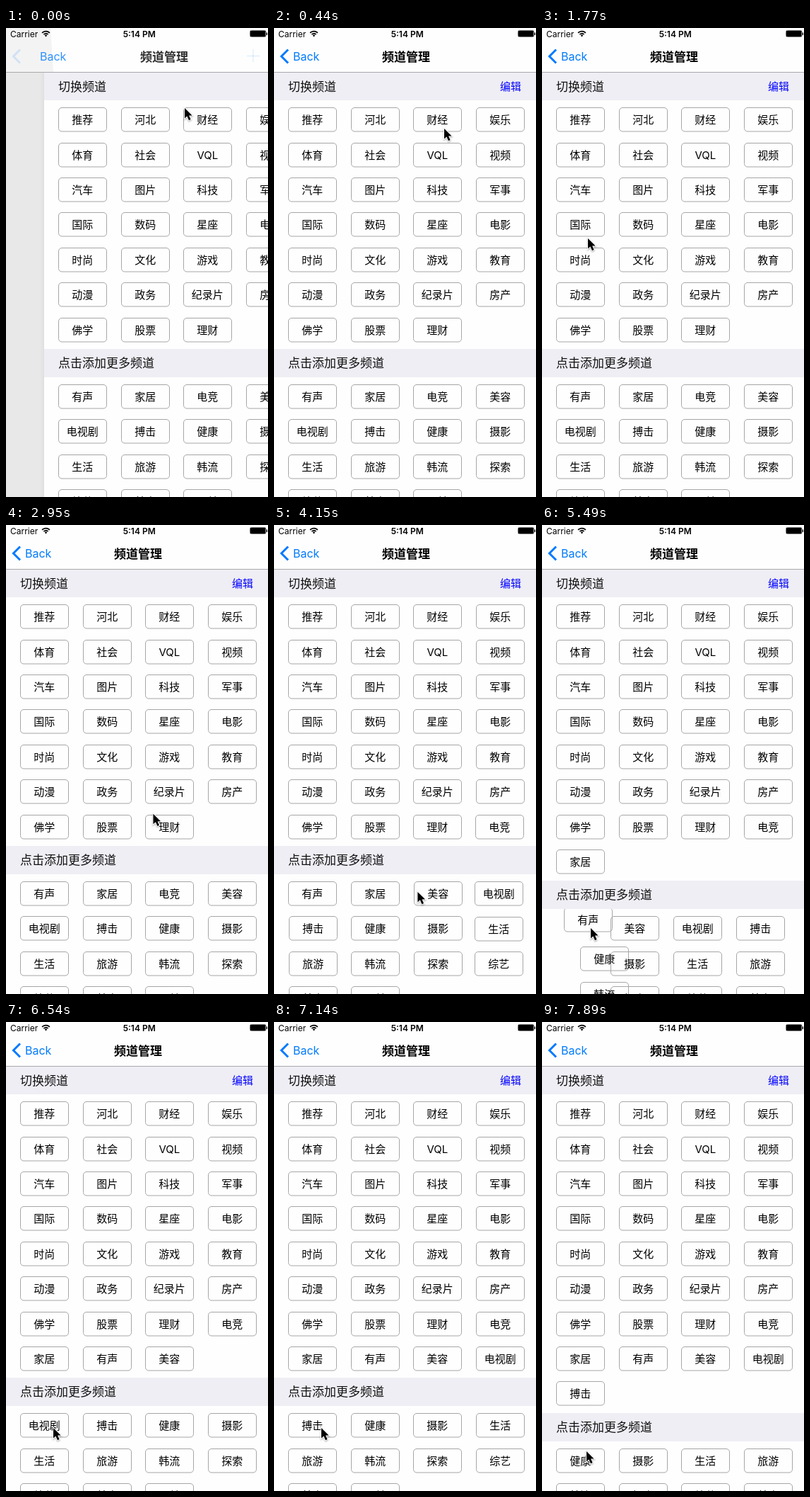
Write an HTML page with a canvas that moves like this. It is 371 by 662 pixels and loops after 8 s.

```html
<!DOCTYPE html>
<html lang="zh-CN">
<head>
<meta charset="utf-8">
<title>频道管理</title>
<style>
html, body { margin: 0; width: 100%; height: 100%; overflow: hidden; background: #fefefe; }
canvas { display: block; width: 371px; height: 662px; }
</style>
</head>
<body>
<canvas id="stage"></canvas>
<script>
const W = 371, H = 662, LOOP = 8000;
const canvas = document.getElementById('stage');
const ctx = canvas.getContext('2d');
const dpr = window.devicePixelRatio || 1;
canvas.width = W * dpr;
canvas.height = H * dpr;

const CJK = '"Noto Sans CJK SC", "Noto Sans CJK", "Noto Sans CJK JP", sans-serif';
const LATIN = 'Inter, sans-serif';
const BLUE = '#007aff';

const mine = ('推荐 河北 财经 娱乐 体育 社会 VQL 视频 汽车 图片 科技 军事 国际 数码 星座 电影 ' +
  '时尚 文化 游戏 教育 动漫 政务 纪录片 房产 佛学 股票 理财').split(' ');
const more = '有声 家居 电竞 美容 电视剧 搏击 健康 摄影 生活 旅游 韩流 探索 综艺 美食 公益'.split(' ');

const COL = 88.7, ROW = 49.4, MOVE = 300;
const taps = [[3862, '电竞'], [4640, '家居'], [5416, '有声'], [6130, '美容'], [6740, '电视剧'], [7370, '搏击']];

// Pointer stops: arrival time, x, y. It rests, then glides for at most GLIDE ms.
const GLIDE = 600;
const stops = [
  [0, 253, 113], [430, 241, 142], [725, 172, 243], [1180, 136, 275], [1465, 112, 249],
  [1760, 65, 297], [2300, 105, 314], [2940, 223, 421], [3690, 221, 517],
  [4580, 127, 522], [5340, 69, 569], [6400, 67, 573], [7850, 63, 606]
];

// The screen refreshes at a coarse, steady rate.
const TICK = 148.6;
const snap = t => Math.max(0, Math.floor((t + 20) / TICK) * TICK - 15);

const lerp = (a, b, f) => a + (b - a) * f;
const ease = f => f <= 0 ? 0 : f >= 1 ? 1 : f * f * (3 - 2 * f);

function pointerAt(t) {
  const next = stops.findIndex(s => s[0] > t);
  if (next < 0) return stops[stops.length - 1].slice(1);
  const [t0, x0, y0] = stops[next - 1], [t1, x1, y1] = stops[next];
  const from = Math.max(t0, t1 - GLIDE);
  const f = ease((t - from) / (t1 - from));
  return [lerp(x0, x1, f), lerp(y0, y1, f)];
}

function layout(count) {
  const moved = taps.slice(0, count).map(p => p[1]);
  const top = mine.concat(moved);
  const header = 106.95 + ROW * Math.ceil(top.length / 4);
  const cells = {};
  const place = (list, y) => list.forEach((name, i) => {
    cells[name] = [20 + COL * (i % 4), y + ROW * Math.floor(i / 4)];
  });
  place(top, 112.2);
  place(more.filter(name => !moved.includes(name)), header + 50);
  return { cells, header };
}
const layouts = Array.from({ length: taps.length + 1 }, (_, n) => layout(n));

function text(str, x, cy, size, color, align = 'left', family = CJK, weight = 400) {
  ctx.font = `${weight} ${size}px ${family}`;
  ctx.textAlign = align;
  ctx.fillStyle = color;
  ctx.fillText(str, x, cy + size * 0.37);
}

function rect(x, y, w, h, color) {
  ctx.fillStyle = color;
  ctx.fillRect(x, y, w, h);
}

function trace(points) {
  ctx.beginPath();
  points.forEach(([x, y]) => ctx.lineTo(x, y));
}

function line(points, color, width) {
  trace(points);
  ctx.strokeStyle = color;
  ctx.lineWidth = width;
  ctx.stroke();
}

function cell(name, x, y) {
  x = Math.round(x);
  y = Math.round(y);
  ctx.beginPath();
  ctx.roundRect(x + 0.5, y + 0.5, 68, 33.5, 4.5);
  ctx.strokeStyle = '#a6a6a6';
  ctx.lineWidth = 1;
  ctx.stroke();
  const latin = /^[A-Z]+$/.test(name);
  text(name, x + 34.3, y + 17.6, 15, '#000', 'center', latin ? LATIN : CJK);
}

function header(y, h, title) {
  rect(0, y, W, h, '#efeef4');
  text(title, 20, y + 19.5, 17, '#111');
}

function page(t, dx) {
  const n = taps.filter(p => p[0] <= t).length;
  const to = layouts[n], from = layouts[Math.max(0, n - 1)];
  const f = n ? ease((t - taps[n - 1][0]) / MOVE) : 1;

  if (dx) {
    rect(0, 63, dx, H - 63, '#e8e8e8');
    const shade = ctx.createLinearGradient(dx - 6, 0, dx, 0);
    shade.addColorStop(0, 'rgba(0,0,0,0)');
    shade.addColorStop(1, 'rgba(0,0,0,.04)');
    rect(dx - 6, 63, 6, H - 63, shade);
  }
  ctx.save();
  ctx.translate(dx, 0);
  rect(0, 63, W, H - 63, '#fefefe');
  for (const name in to.cells) {
    const [x0, y0] = from.cells[name], [x1, y1] = to.cells[name];
    cell(name, lerp(x0, x1, f), lerp(y0, y1, f));
  }
  header(63, 39, '切换频道');
  text('编辑', 320, 82.5, 15, '#0000ff');
  header(Math.round(lerp(from.header, to.header, f)), 40, '点击添加更多频道');
  ctx.restore();
}

function navBar(dx) {
  const out = dx / 54;
  rect(0, 0, W, 62, '#fefefe');
  if (dx) {
    trace([[0, 0], [dx + 9, 0], [dx + 13, 62], [0, 62]]);
    ctx.fillStyle = '#f3f3f3';
    ctx.fill();
    ctx.globalAlpha = 0.14 * out;
    line([[341, 39.5], [359, 39.5]], BLUE, 1.2);
    line([[350, 30], [350, 48]], BLUE, 1.2);
  }
  ctx.globalAlpha = 1 - 0.86 * out;
  line([[20, 30.5], [10.5, 40], [20, 49.5]], BLUE, 3);
  ctx.globalAlpha = 1 - 0.18 * out;
  text('Back', 27 + 21 * out, 40.3, 16, BLUE, 'left', LATIN);
  text('频道管理', 187 + 37 * out, 40.3, 17, '#000', 'center', CJK, 700);
  ctx.globalAlpha = 1;
  rect(0, 62, W, 1, '#a9a9ab');
}

function statusBar() {
  text('Carrier', 6, 8.3, 12, '#000', 'left', LATIN);
  text('5:14 PM', 188.7, 8.3, 12, '#000', 'center', LATIN, 600);
  const wave = [-Math.PI * 0.76, -Math.PI * 0.24];
  ctx.strokeStyle = '#000';
  ctx.lineWidth = 1.7;
  for (const r of [4.2, 7.4]) {
    ctx.beginPath();
    ctx.arc(56.5, 12, r, ...wave);
    ctx.stroke();
  }
  ctx.beginPath();
  ctx.moveTo(56.5, 12.5);
  ctx.arc(56.5, 12, 2.3, ...wave);
  ctx.fillStyle = '#000';
  ctx.fill();

  ctx.beginPath();
  ctx.roundRect(345.5, 3.5, 22.5, 9, 2);
  ctx.strokeStyle = '#777';
  ctx.lineWidth = 1;
  ctx.stroke();
  rect(346, 4, 21.5, 8, '#000');
  rect(368.7, 6.5, 1.3, 3.5, '#000');
}

function pointer(x, y) {
  ctx.save();
  ctx.translate(x, y);
  trace([[0, 0], [0, 14.5], [3.4, 11.4], [6, 17.2], [8.6, 16], [6.1, 10.6], [10.6, 10.4]]);
  ctx.closePath();
  ctx.shadowColor = 'rgba(0,0,0,.35)';
  ctx.shadowBlur = 2 * dpr;
  ctx.shadowOffsetY = dpr;
  ctx.strokeStyle = '#fff';
  ctx.lineWidth = 2;
  ctx.stroke();
  ctx.shadowColor = 'transparent';
  ctx.fillStyle = '#000';
  ctx.fill();
  ctx.restore();
}

function draw(t) {
  const dx = t < 400 ? Math.round(54 * Math.exp(-t / 130)) : 0;
  ctx.setTransform(dpr, 0, 0, dpr, 0, 0);
  page(t, dx);
  navBar(dx);
  statusBar();
  pointer(...pointerAt(t));
}

const start = performance.now();
function loop() {
  draw(snap((performance.now() - start) % LOOP));
  requestAnimationFrame(loop);
}
loop();
</script>
</body>
</html>
```
